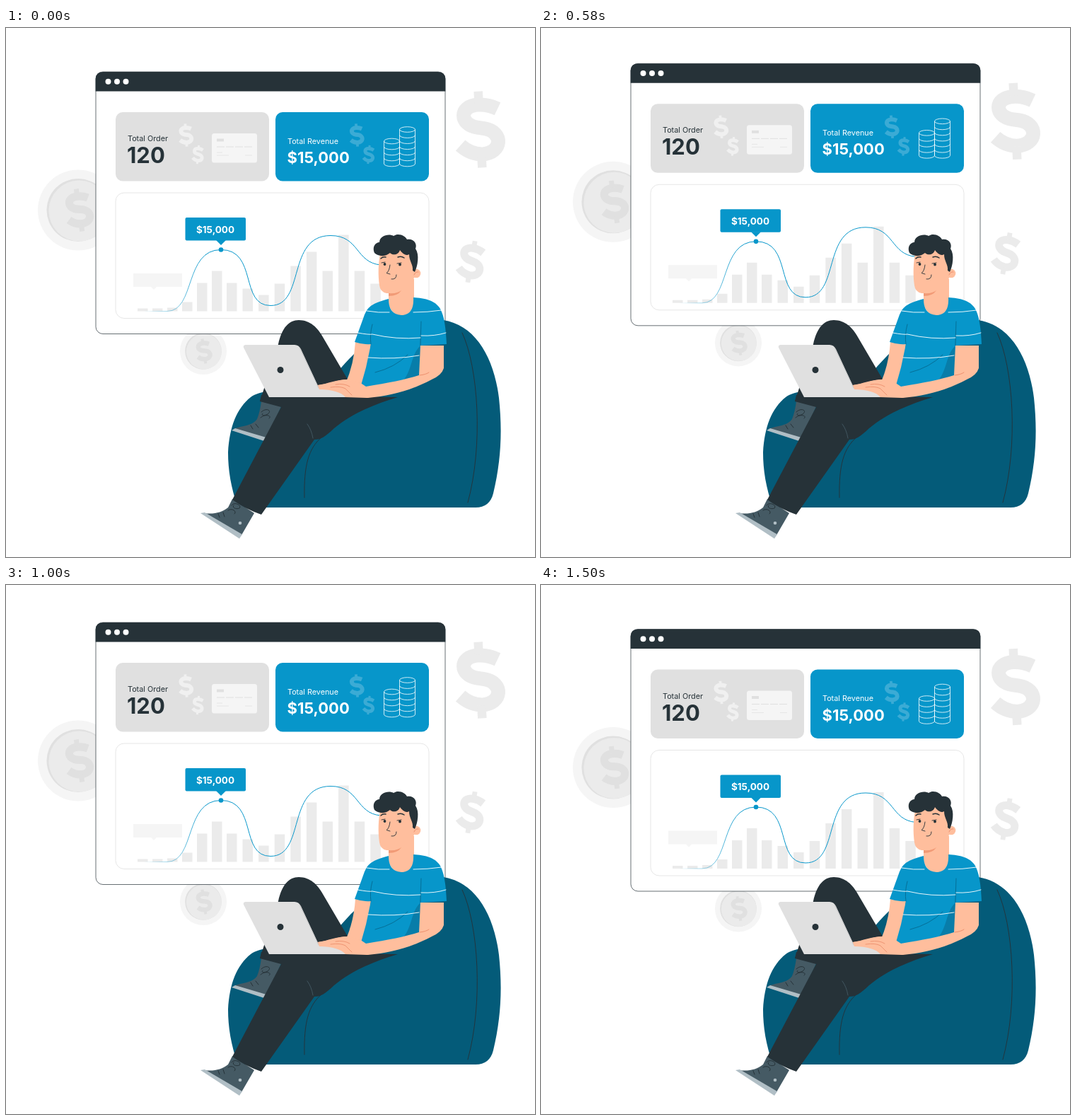
Write an HTML page that moves like this. It is 748 px wide and 748 px high and loops after 1540 ms.

```html
<!DOCTYPE html>
<html lang="en">
<head>
<meta charset="utf-8">
<title>Revenue dashboard</title>
<style>
  html, body { margin: 0; width: 100%; height: 100%; overflow: hidden; background: #fff; }
  svg { display: block; width: 100vw; height: 100vh; }
  text { font: 10.8px Inter, "Open Sans", sans-serif; }
  .bold { font-weight: 700; }
  .line { fill: none; stroke: #263238; stroke-linecap: round; }
  .dark { fill: #263238; }
  .blue { fill: #0796ca; }
  .skin { fill: #ffbe9d; }
  .shoe { fill: #455a64; }
  .sole { fill: #b0bec5; }
</style>
</head>
<body>
<svg viewBox="0 0 748 748">
  <defs>
    <g id="dollar" fill="none">
      <path d="M26-28Q13-35-1-35C-29-35-29-8-4-3L6-1C33 5 30 35 1 35Q-16 34-29 21" stroke-width="20"/>
      <path d="M0-54V-36M0 36V54" stroke-width="12.5"/>
    </g>
    <g id="coin">
      <circle r="57" fill="#f5f5f5"/>
      <circle r="44.5" fill="#e0e0e0"/>
      <circle cx="1.5" cy="1" r="43" fill="#ebebeb"/>
      <use href="#dollar" transform="translate(1.500 0) rotate(-8) scale(.56)" stroke="#e0e0e0"/>
    </g>
    <linearGradient id="fade" gradientUnits="userSpaceOnUse" x1="195" x2="285">
      <stop stop-color="#0796ca" stop-opacity="0"/>
      <stop offset="1" stop-color="#0796ca"/>
    </linearGradient>
  </defs>

  <g id="floating">
    <use href="#coin" transform="translate(102 257.5)"/>
    <use href="#coin" transform="translate(279 457) scale(.58)"/>
    <g stroke="#ebebeb">
      <use href="#dollar" transform="translate(670.5 143.5) rotate(-3)"/>
      <use href="#dollar" transform="translate(658 330.5) rotate(10) scale(.55)"/>
    </g>

    <rect x="127" y="62" width="494" height="370.5" rx="10" fill="#fff" stroke="#263238" stroke-width=".7"/>
    <path class="dark" d="M126.700 89.500V72Q127 62 137 62H611Q621 62 621.300 72V89.500Z"/>
    <g fill="#fff"><circle cx="144.500" cy="75.700" r="4"/><circle cx="157" cy="75.700" r="4"/><circle cx="169.500" cy="75.700" r="4"/></g>

    <rect x="155" y="119" width="217" height="97.500" rx="10" fill="#e0e0e0"/>
    <text class="dark" x="172" y="160">Total Order</text>
    <text class="dark bold" x="171" y="191" style="font-size:31px">120</text>
    <g stroke="#f0f0f0">
      <use href="#dollar" transform="translate(254.500 151.500) rotate(-4) scale(.3)"/>
      <use href="#dollar" transform="translate(271.500 179) rotate(5) scale(.245)"/>
    </g>
    <rect x="291" y="149" width="64" height="41.500" rx="3.500" fill="#f5f5f5"/>
    <path d="M298 158.500h10" stroke="#e0e0e0" stroke-width="4"/>
    <path d="M298 168h50" stroke="#e0e0e0" stroke-dasharray="11 2"/>
    <path d="M298 176h8M298 180h17M338 180h10" stroke="#e6e6e6"/>

    <rect class="blue" x="381" y="119" width="217" height="97.500" rx="10"/>
    <text x="398" y="163.500" fill="#fff">Total Revenue</text>
    <text class="bold" x="397.500" y="191" fill="#fff" style="font-size:22px">$15,000</text>
    <g stroke="#3babd5">
      <use href="#dollar" transform="translate(496 151.500) rotate(-4) scale(.3)"/>
      <use href="#dollar" transform="translate(513 179) rotate(5) scale(.245)"/>
    </g>
    <g id="stacks" fill="none" stroke="#fff" stroke-width=".8"></g>

    <rect x="155" y="233" width="443" height="177.500" rx="12" fill="#fff" stroke="#e0e0e0" stroke-width=".8"/>
    <path id="bars" fill="#ebebeb"/>
    <path d="M180 347H249V366H213L209 370L205 366H180Z" fill="#f5f5f5"/>
    <path fill="none" stroke="url(#fade)" d="M195 400.500H228C268 400 252 313.500 304 313.500C356 313.500 330 392.500 374 392.500C424 392.500 396 293.500 459 293.500C500 293.500 494 332 530 335"/>
    <rect class="blue" x="253.500" y="268" width="85.500" height="32.500" rx="2"/>
    <path class="blue" d="M297 300H311L304 307Z"/>
    <circle class="blue" cx="304" cy="313.500" r="3.300"/>
    <text class="bold" x="296" y="289.500" fill="#fff" text-anchor="middle" style="font-size:13.5px">$15,000</text>
  </g>

  <!-- beanbag -->
  <path fill="#045b79" d="M328 678C318 650 314 625 314 600C316 564 326 538 346 522C365 508 420 512 455 500C474 482 486 464 505 450C540 420 590 410 618 413C664 420 690 466 697 523C702 570 700 612 689 658Q684 678 664 678Z"/>
  <path class="line" stroke-width=".9" d="M645 431C668 480 675 590 653 671M422 664C421 618 428 594 446 579"/>

  <!-- shoes and legs -->
  <path class="shoe" d="M361 528L389 535L369 580L322 567C334 562 348 563 355 553Q359 543 361 528Z"/>
  <path class="sole" d="M319 569L324 566L368 579L365 584Z"/>
  <path class="line" d="M361 543C368 536 377 541 370 546C362 550 361 546 363 545M360 551C366 545 377 548 372 552M353 560l4 5M346 562l3 5"/>
  <path class="shoe" d="M320 666L351 686L333 717L280 686C294 688 305 685 314 678Z"/>
  <path class="sole" d="M275 686L281 685L334 716L330 722Z"/>
  <circle class="sole" cx="331" cy="700" r="2.300"/>
  <path class="line" d="M319 675C323 669 334 675 330 679C325 681 319 678 322 675M314 682C320 678 327 684 323 687M307 685l2 6M300 687l2 5"/>
  <path class="dark" d="M359 528L385 447C390 424 400 413 414 413C430 413 441 424 448 437L492 512Z"/>
  <path class="dark" d="M361 519L554 522C520 532 488 546 464 566C451 578 446 582 436 582L361 688Q340 681 320 667L389 536L359 528Z"/>
  <path class="line" style="stroke:#455a64" stroke-width=".9" d="M426 560Q432 568 434 580"/>

  <!-- arms, neck and shirt -->
  <path class="skin" d="M494 444L516 446L510 507L480 503Q492 475 494 444Z"/>
  <path class="skin" d="M541 355H577V392Q572 406 559 407Q544 405 541 389Z"/>
  <path class="blue" d="M541 383C518 389 511 394 506 408L493 444Q505 448 516 447L509 480L502 505L515 510L584 492L586 449L623 447C622 425 620 408 614 397C607 385 592 382 576 381C577 399 570 406 559 406C546 405 541 397 541 383Z"/>
  <path fill="#087da9" d="M586 426L585 491L562 498C575 482 572 463 586 449Z"/>
  <path class="line" style="stroke:#066a91" stroke-width=".9" d="M518 419Q514 434 516 447M568 462Q550 480 522 487M586 449L587 415"/>
  <path class="line" style="stroke:#fff" stroke-width=".9" d="M510 400Q527 403 542 402M576 402Q596 402 616 399M497 431Q514 434 518 433Q552 441 586 438M587 435Q606 436 622 431M512 466Q550 469 584 463"/>
  <path class="skin" d="M586 449L619 449V481Q616 491 602 497C574 512 544 520 512 523L480 522C472 516 458 512 442 511L441 505C456 504 468 497 484 497Q497 498 509 507C540 502 565 497 584 491Z"/>
  <path class="line" style="stroke:#e98b69" stroke-width=".9" d="M585 491Q594 490 598 487"/>

  <!-- laptop -->
  <path fill="#e0e0e0" d="M339 448H408Q414 448 417 454L443 510L477 512L481 522H372L336 452Q335 448 339 448Z"/>
  <path class="line" style="stroke:#c7c7c7" stroke-width=".8" d="M415 452L442 509"/>
  <circle class="dark" cx="388" cy="483.500" r="4.500"/>
  <path class="skin" d="M441 505C455 503 467 497 484 497L505 510L512 522H480C474 515 461 511 443 511Z"/>
  <path class="line" style="stroke:#e98b69" stroke-width=".8" d="M459 508Q473 506 480 510L489 519M466 504Q478 502 486 507"/>

  <!-- head -->
  <circle class="skin" cx="580" cy="347" r="6.300"/>
  <path class="skin" d="M530 314L573 314L578 350C574 365 565 373 552 375L538 375Q529 373 528 364C526 350 526 332 530 314Z"/>
  <path fill="#f19a76" d="M541 375Q553 376 559 371Q554 379 541 379Z"/>
  <path class="dark" d="M521 318C517 308 524 303 528 303C528 294 541 290 548 294C555 289 565 294 567 299C576 297 582 305 579 312C585 320 582 337 578 345L575 343C576 334 570 330 570 320C565 323 560 318 557 314C555 321 547 322 543 318C536 324 526 323 521 318Z"/>
  <path class="line" stroke-width="1.500" d="M530 326Q533 323 537 324M554 324Q559 322 563 325"/>
  <path class="line" stroke-width=".9" d="M543 335Q542 344 538 346.500L543 348M545 355Q552 356 552 349M531 332l5-1M553 333l6-1"/>
  <path class="line" style="stroke:#e98b69" stroke-width=".9" d="M577 349Q579 344 583 345"/>
  <circle class="dark" cx="535.500" cy="334" r="1.900"/><circle class="dark" cx="557" cy="334.500" r="1.900"/>
</svg>
<script>
  const byId = id => document.getElementById(id);

  const barHeights = [4, 4, 5, 13, 40, 57, 40, 32, 23, 39, 64, 84, 57, 108, 57, 39];
  byId('bars').setAttribute('d', barHeights.map((h, i) => {
    const x = i < 7 ? 186 + i * 21 : 334.5 + (i - 7) * 22.6;
    return `M${x} 400.5v${-h}h14.500v${h}z`;
  }).join(''));

  function coinStack(x, top, rows) {
    const step = (192 - top) / rows;
    let d = `M${x} ${top}V192M${x + 22} ${top}V192M${x} ${top}a11 3.800 0 0 1 22 0`;
    for (let i = 0; i <= rows; i++) d += `M${x} ${top + i * step}a11 3.800 0 0 0 22 0`;
    return `<path d="${d}"/>`;
  }
  byId('stacks').innerHTML = coinStack(534.5, 160, 4) + coinStack(556.5, 143.5, 6);

  // Linear rise and fall at 24 steps per second, resting at the bottom before the loop restarts.
  const LOOP = 1540, LAST_STEP = 36, RISE = 15;
  const floating = byId('floating');
  const start = performance.now();

  function draw(now) {
    const time = Math.max(0, now - start) % LOOP;
    const step = Math.min(LAST_STEP, Math.floor((time + 5) * 24 / 1000));
    const phase = (step + 0.6) / LAST_STEP;
    const lift = RISE * Math.max(0, 1 - Math.abs(1 - 2 * phase));
    floating.setAttribute('transform', `translate(0 ${(0.5 - lift).toFixed(2)})`);
    requestAnimationFrame(draw);
  }
  draw(start);
</script>
</body>
</html>
```
